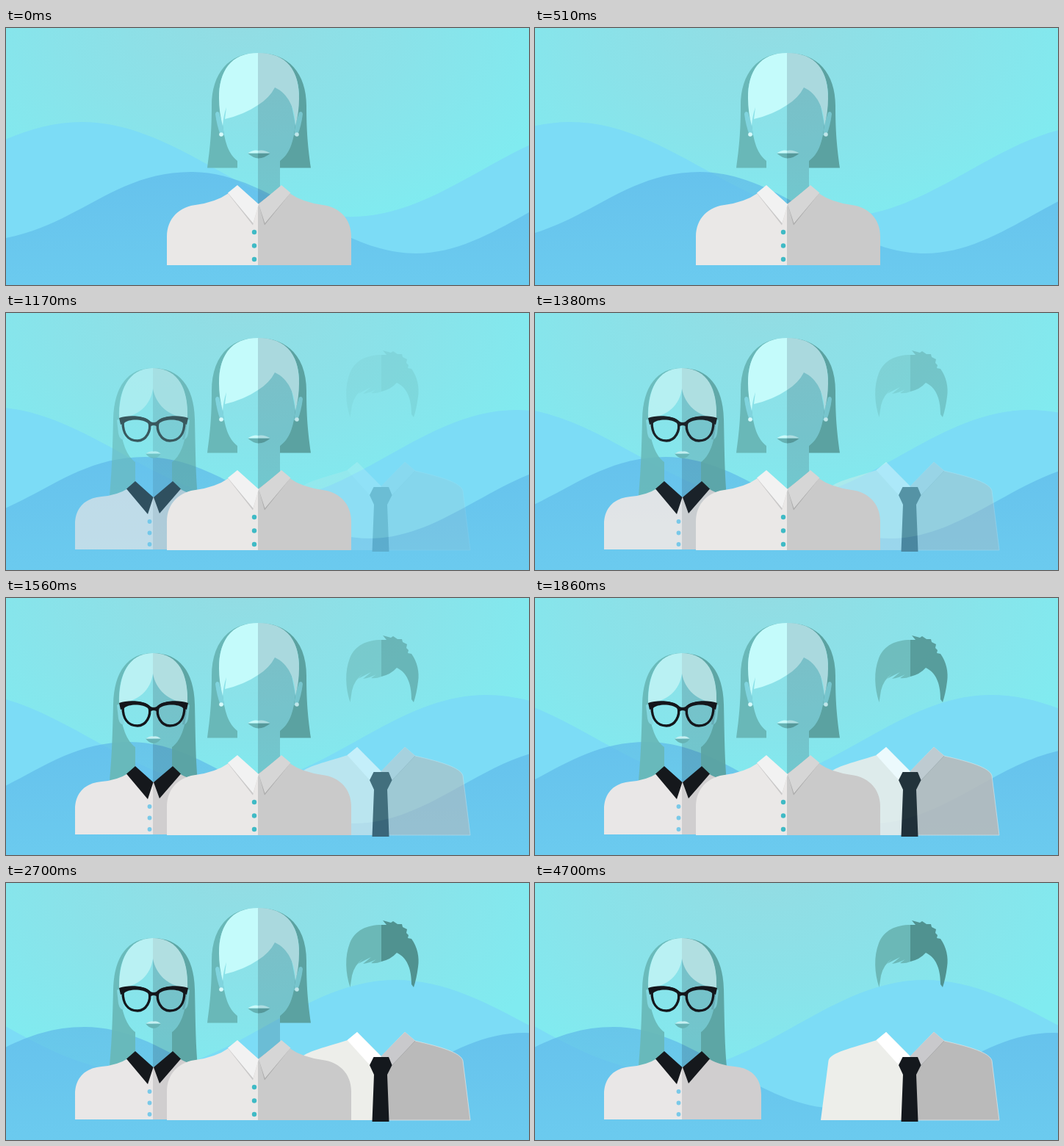
An HTML page for the animation above (5930 ms loop, 712 by 350 pixels).

```html
<!DOCTYPE html>
<html lang="en">
<head>
<meta charset="utf-8">
<title>Three portraits over waves</title>
<style>
html, body { margin: 0; width: 100%; height: 100%; overflow: hidden; }
body { background: radial-gradient(ellipse 470px 300px at 44% -4%, #93dce3, #8ae2e9 50%, #80ebf0); }
svg { display: block; width: 712px; height: 350px; }
.soft { filter: blur(.55px); }
</style>
</head>
<body>
<svg viewBox="0 0 712 350">
  <defs>
    <linearGradient id="deep" gradientUnits="userSpaceOnUse" x1="0" y1="196" x2="0" y2="350">
      <stop offset="0" stop-color="#5cb6e8"/>
      <stop offset="1" stop-color="#63c2eb"/>
    </linearGradient>
  </defs>

  <path id="light" fill="#7cdcf6"/>
  <path id="dark" fill="url(#deep)" fill-opacity=".68"/>

  <g id="left" opacity="0"><g class="soft">
    <!-- hair -->
    <path fill="#69b8b8" fill-opacity=".94" d="M200 75C166 75 147 100 146 145C145 190 144 215 141 250H176V203C165 195 157 178 154 143C153 108 164 77 200 75Z"/>
    <path fill="#5ba2a1" fill-opacity=".94" d="M200 75C236 75 256 100 257 145C258 190 258 215 261 250H226V203C237 195 245 178 247 143C248 108 237 77 200 75Z"/>
    <!-- ears and shaded half of the face -->
    <path fill="#84d8e0" d="M151 146Q155 142 157 150L161 172Q155 174 153 164Z"/>
    <path fill="#78c8d0" d="M250 146Q246 142 244 150L240 172Q246 174 248 164Z"/>
    <path fill="#141e28" fill-opacity=".16" d="M200 100L247 143C245 178 237 195 226 203V232L201 252H200Z"/>
    <path fill="#b9f1f3" d="M200 75C166 76 154 104 154 143C181 141 197 125 200 103Z"/>
    <path fill="#b1dfe1" d="M200 75C236 76 248 104 247 143C221 141 204 125 200 103Z"/>
    <!-- mouth -->
    <path fill="#66b3b5" d="M190 191.500H211Q207 198 201 198T190 191.500Z"/>
    <path fill="#c5eff1" d="M190 191.500Q197 187 201 188.500Q205 187 211 191.500Z"/>
    <!-- glasses -->
    <g fill="none" stroke="#14161b" stroke-width="3.400">
      <path d="M159 148C164 141 190 141 195 149C198 160 191 174 179 174C165 174 159 163 159 148Z"/>
      <path d="M243 148C238 141 212 141 207 149C204 160 211 174 223 174C237 174 243 163 243 148Z"/>
    </g>
    <path fill="#14161b" d="M154 143C168 138 190 140 197 148Q201 150 205 148C212 140 234 138 248 143L246 152L241 150C235 144 215 144 208 151L206 155Q201 151 196 155L194 151C187 144 167 144 161 150L156 152Z"/>
    <!-- shirt -->
    <path fill="#e9e7e7" d="M94 322V288C94 265 108 252 130 250Q152 248 166 239L200 251V322Z"/>
    <path fill="#d0cecf" d="M308 322V288C308 265 294 252 272 250Q250 248 236 239L200 251V322Z"/>
    <path fill="#15181c" d="M176 229L200.500 251L193 274L164 239.500ZM227 229L238 239.500L209 273L201 251Z"/>
    <g fill="#7ac9e8"><circle cx="195.500" cy="284" r="2.900"/><circle cx="195.500" cy="299.500" r="2.900"/><circle cx="195.500" cy="315" r="2.900"/></g>
  </g></g>

  <g id="right" opacity="0"><g class="soft">
    <!-- hair -->
    <path fill="#6bb8b7" d="M468.500 142C462 122 461 100 468 82C475 64 492 57 511 57V107Q504 110 497 109L504 104Q495 109 486 110L497 101Q487 106 479 110L486 103Q474 112 471 126Z"/>
    <path fill="#509290" d="M511 57L518 57L513 51L524 54L527 52L533 56L539 56L540 60L546 63L545 68L548 71L547 75L552 76C560 87 563 101 561 114Q559 130 555 142L552 138C552 115 545 101 532 95Q524 104 511 107Z"/>
    <!-- shirt -->
    <path fill="#edeeea" d="M389 323L399.500 242C402 231 430 225 465 214L478 203L511 236V323Z"/>
    <path fill="#bababa" stroke="#d9e2e5" stroke-width=".8" d="M632 323L622 242C619 231 592 223 557 215L543 203L511 236V323Z"/>
    <path fill="#fff" d="M478 203L510.500 236L497 250L464.500 214Z"/>
    <path fill="#c9c9cc" d="M543 203L557 215L524 250L510.500 236Z"/>
    <path fill="none" stroke="#a5a6a8" stroke-width=".8" d="M557 215L524 250"/>
    <path fill="#14181d" d="M500.500 237H521L525.500 248L519 261L521.500 325H498.500L501 261L495 248Z"/>
  </g></g>

  <g id="front">
    <!-- hair -->
    <path fill="#69b8b8" d="M343 34C303 34 280 62 280 106C280 141 278 162 274 190.500H315V181C303 171 298 157 295 132L290 90C291 55 312 34 343 34Z"/>
    <path fill="#5ba2a1" d="M343 34C385 34 409 62 409 106C409 141 411 162 415 190.500H373V181C386 171 391 157 394 132L399 90C398 55 377 34 343 34Z"/>
    <!-- ears and shaded half of the face -->
    <path fill="#80d4de" d="M285 117Q286 112 290 115L295 131L297 146H292Q287 133 285 117Z"/>
    <path fill="#76c5cd" d="M404 117Q403 112 399 115L394 131L392 146H397Q402 133 404 117Z"/>
    <path fill="#141e28" fill-opacity=".16" d="M343 60H380L394 132C391 157 386 171 373 181V217L345 241H343Z"/>
    <path fill="#c4fbfb" d="M343 34C306 34 290 58 290 96Q290 115 295 133Q296 119 300 108L298 124Q324 118 343 105Z"/>
    <path fill="#aad9de" d="M343 34C383 34 399 58 399 96Q399 115 394 133C394 110 384 89 366 81Q359 95 343 105Z"/>
    <circle cx="293" cy="145" r="2.800" fill="#d8fafa"/>
    <circle cx="396" cy="145" r="2.800" fill="#bfe5e9"/>
    <!-- mouth -->
    <path fill="#65b2b3" d="M329 170.500H344V177.500Q336 177 329 170.500Z"/>
    <path fill="#55989a" d="M360 170.500H343V177.500Q353 177 360 170.500Z"/>
    <path fill="#c9fafa" d="M329 170.500Q338 165 343.500 167V170.500Z"/>
    <path fill="#aedde1" d="M360 170.500Q350 165 343.500 167V170.500Z"/>
    <!-- shirt -->
    <path fill="#eae8e7" d="M219 323V284C219 260 235 244 258 241Q286 237 303 225L315 216L343.500 240V323Z"/>
    <path fill="#cacaca" d="M470 323V284C470 260 454 244 431 241Q403 237 386 225L374 216L343 240V323Z"/>
    <path fill="#c9c8c8" d="M302 225L336 268.500L343.500 241Z"/>
    <path fill="#a9a9a9" d="M387 225L352 268.500L344.500 241Z"/>
    <path fill="#f2f2f2" d="M315 214L344 240L336.500 266L302 224.500Z"/>
    <path fill="#d6d6d6" d="M375 214L387.500 224.500L352.500 266L344 240Z"/>
    <g fill="#3fbac5"><circle cx="338" cy="278" r="3.200"/><circle cx="338" cy="296.500" r="3.200"/><circle cx="338" cy="315" r="3.200"/></g>
  </g>
</svg>
<script>
const LOOP = 5930, STEP = 30, STOP = 2700, HIDE = 4700;
const el = id => document.getElementById(id);
const [light, dark, left, right, front] = ['light', 'dark', 'left', 'right', 'front'].map(el);

// Half cosine arcs between crests and troughs
function arcs(points) {
  let [px, py] = points[0], d = '';
  for (const [x, y] of points.slice(1)) {
    const h = (x - px) * 0.3642;
    d += `C${px + h} ${py} ${x - h} ${y} ${x} ${y}`;
    [px, py] = [x, y];
  }
  return d + `V360H-300Z`;
}
light.setAttribute('d', 'M-264 257' + arcs([[-264, 257], [103, 128], [470, 257], [822, 132], [1189, 257]]));
dark.setAttribute('d', 'M-300 300L0 286C100 266 150 196 252 196' +
  arcs([[252, 196], [558, 307], [850, 204], [1150, 307]]));

const ramp = (t, start, span) => Math.min(1, Math.max(0, (t - start) / span));

function draw(now) {
  const t = Math.floor((now % LOOP) / STEP) * STEP;
  const k = ramp(t, 0, STOP);
  light.setAttribute('transform', `translate(${-292 * k} 0)`);
  dark.setAttribute('transform', `translate(${-145 * k} 0)`);
  left.setAttribute('opacity', ramp(t, 630, 800));
  right.setAttribute('opacity', ramp(t, 1020, 980));
  front.setAttribute('visibility', now % LOOP < HIDE ? 'visible' : 'hidden');
}

let begin;
function tick(now) {
  begin ??= now;
  draw(now - begin);
  requestAnimationFrame(tick);
}
draw(0);
requestAnimationFrame(tick);
</script>
</body>
</html>
```
